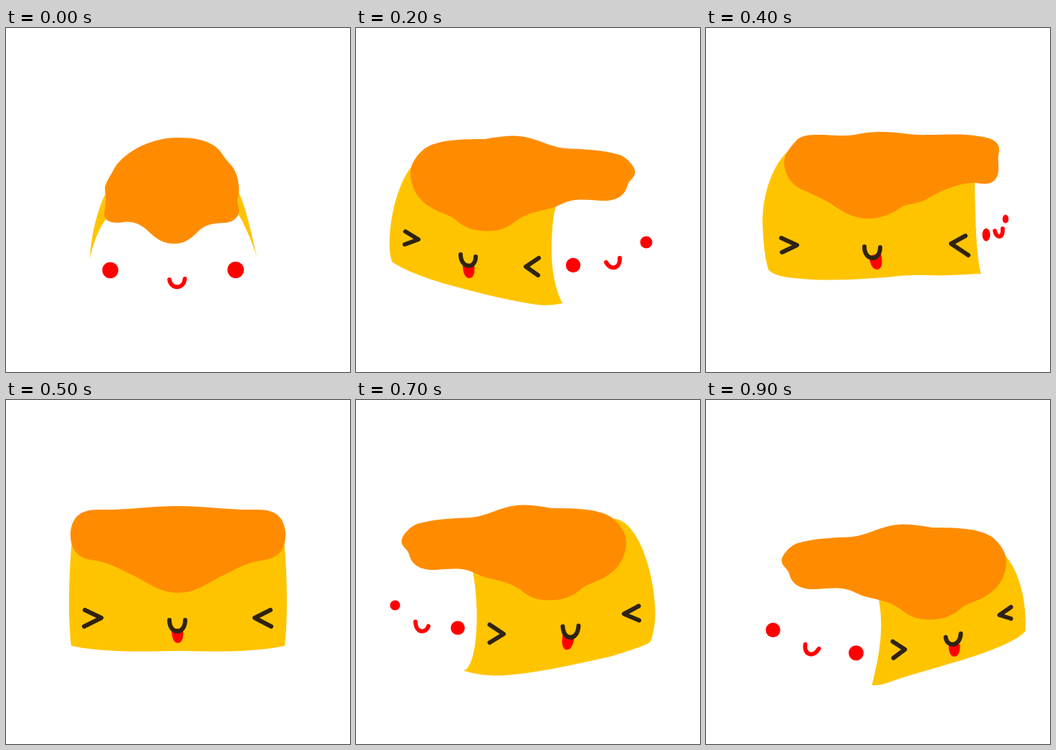
Write an HTML page that moves like this. It is 480 by 480 pixels and loops after 1000 ms.

```html
<!DOCTYPE html>
<html lang="en">
<head>
<meta charset="utf-8">
<title>Spinning pudding</title>
<style>
  html, body { margin: 0; width: 100%; height: 100%; overflow: hidden; background: #fff; }
  svg { display: block; width: 100%; height: 100%; }
  .pose {
    visibility: hidden;
    animation: show 1s step-end infinite;
    animation-delay: calc(var(--i) * 100ms - 1000ms);
  }
  @keyframes show {
    0% { visibility: visible; }
    10%, 100% { visibility: hidden; }
  }
  .cake { fill: #ffc400; }
  .sauce { fill: #ff8c00; }
  .red { fill: #f00; }
  .ink, .smile { fill: none; stroke-linecap: round; stroke-linejoin: round; }
  .ink { stroke: #2f2312; stroke-width: 6; }
  .smile { stroke: #f00; stroke-width: 5.8; }
</style>
</head>
<body>
<svg viewBox="0 0 480 480">
  <defs>
    <!-- sauce seen from two turned angles -->
    <path id="sauceWide" class="sauce" d="M96 190C96 178 104 166 116 156C134 144 165 143 200 143C215 140 228 138.500 240 138.500C270 139 285 153 312 156C335 157 365 158 388 165C400 170 410 183 409.500 190C408 198 402 199 399 207C396 220 386 230 362 229C346 228 330 226 316 230C304 234 300 238 288 240.500C270 245 258 247 245 256C230 268 220 271.500 202 271.500C180 271 168 264 157 254C146 247 134 245 124 238C108 229 96 212 96 190Z"/>
    <path id="sauceFlat" class="sauce" d="M109 188C109 176 118 166 126 157C134 148 150 149 165 149C180 150 192 151 208 149C222 145 240 145 248 145C268 145 285 150 310 149C335 149 360 147 380 151C400 153 411 160 409 173C406 182 409 190 408 200C406 214 398 219 382 217C368 214 352 219 338 224C326 228 316 234 304 241C290 246 284 245 274 249C260 259 245 266 226 266C202 265 190 255 178 248C168 240 152 234 140 228C122 222 110 208 109 188Z"/>

    <!-- cake with both faces, from steep to nearly frontal -->
    <g id="steep">
      <path class="cake" d="M68 207C46 222 30 270 33 318C38 328 75 345 125 360C165 372 195 380 218 388C230 393 238 394 247 394C236 350 229 310 239 267L200 200Z"/>
      <path class="red" d="M124 337Q124 354 132 354Q140 354 140 337Z"/>
      <path class="ink" d="M53 285L69 296L53 301M218 333L201 344L217 356M123 322C124 341 143 341 144 327"/>
      <circle class="red" cx="269" cy="349" r="10.5"/>
      <circle class="red" cx="385" cy="317" r="10.2"/>
      <path class="smile" d="M321 343C328 355 342 353 340 337"/>
    </g>
    <g id="turned">
      <path class="cake" d="M84 187C64 202 45 258 47 309C47 316 49 321 50 326C62 335 90 347 128 358C168 369 208 379 245 385C262 388 275 387 288 384C277 362 270 330 274 280C275 264 277 256 280 245L200 190Z"/>
      <path class="red" d="M149 331C149 343 153 349 158 349C165 349 166 340 165 330Z"/>
      <path class="ink" d="M69 284L87 295L68 302M255 321L237 333L254 345M146 316C146 336 167 337 167 319"/>
      <circle class="red" cx="303" cy="331" r="10.2"/>
      <circle class="red" cx="405" cy="299" r="8.5"/>
      <path class="smile" d="M349 327C354 338 369 337 368 321"/>
    </g>
    <g id="wide">
      <path class="cake" d="M118 161C112 162 104 165 98 172C76 195 61 250 61 293C61 310 64 321 66 329C68 335 74 337 85 341C102 346 115 352 135 356C180 366 230 377 275 380C297 380.500 313 378 329 373C318 373 309 340 310 290C311 262 313 245 317 230L200 180Z"/>
      <path class="red" d="M174 324C174 336 179 345 185 344C191 343 192 334 190 322Z"/>
      <path class="ink" d="M84 283L104.500 294L83.500 303M292 309L272.500 322L292 334M168 310.500C169 332 189 332 190 311.500"/>
      <circle class="red" cx="336.500" cy="313.500" r="9.800"/>
      <circle class="red" cx="424" cy="282" r="7"/>
      <path class="smile" d="M377.500 311C380 321 395 322 395.500 305"/>
    </g>
    <g id="flat">
      <path class="cake" d="M116 170C94 190 78 230 79 275C80 300 82 320 87 337C94 346 112 348 134 350C170 353 210 351 250 348C275 345 290 344 315 345C345 346 365 343 384 343C380 330 376 300 375 216L240 180Z"/>
      <path class="red" d="M228 318C228 330 233 337 239 337C246 336 247 327 244 314Z"/>
      <path class="ink" d="M105 293L127 303L106 313M362 290L342 301L366 317M221 305C221 326 243 326 243 306"/>
      <ellipse class="red" cx="391" cy="288.5" rx="5.5" ry="9"/>
      <ellipse class="red" cx="418" cy="266.5" rx="4.2" ry="6"/>
      <path class="smile" d="M403 283C405 294 415 294 414 280"/>
    </g>
  </defs>

  <!-- back: cut side with the small smile -->
  <g class="pose" style="--i:0">
    <path class="cake" d="M138 232C128 255 119 285 117 322C122 300 128 282 140 266ZM324 228C335 250 342 285 350 319C342 295 332 272 323 258Z"/>
    <path class="sauce" d="M138 222C142 210 146 206 150 198C160 178 196 153 240 153C262 153 278 156 290 164C300 170 303 180 312 189C320 197 324 208 325 222C326 232 321 240 325 252C327 262 318 272 303 272C292 273 282 272 270 282C258 294 250 301 234 301C220 301 209 294 199 284C188 273 176 269 163 271C150 273 137 271 137 259C139 247 139 235 138 222Z"/>
    <circle class="red" cx="145.5" cy="338" r="11.2"/>
    <circle class="red" cx="320.5" cy="337.5" r="11.5"/>
    <path class="smile" d="M228 351C230 365 248 365 249.500 350"/>
  </g>

  <g class="pose" style="--i:1">
    <use href="#steep"/>
    <path class="sauce" d="M66 212C68 197 88 174 122 167C150 162 172 161 190 161C212 161 230 170 254 174C275 178 296 175 320 183C338 189 354 200 351 213C348 228 338 228 331 240C324 252 322 262 309 262C296 262 286 252 268 254C256 256 246 265 238 269C222 273 208 274 194 284C182 292 168 297 154 297C138 296 132 283 118 276C106 270 92 275 76 260C64 248 70 228 66 212Z"/>
  </g>
  <g class="pose" style="--i:2">
    <use href="#turned"/>
    <use href="#sauceWide" x="-20" y="12"/>
  </g>
  <g class="pose" style="--i:3">
    <use href="#wide"/>
    <use href="#sauceWide"/>
  </g>
  <g class="pose" style="--i:4">
    <use href="#flat"/>
    <use href="#sauceFlat"/>
  </g>

  <!-- front -->
  <g class="pose" style="--i:5">
    <path class="cake" d="M92 195C88 240 86 300 91 343C140 353 195 351 240 350C285 351 340 353 389 343C394 300 392 240 388 195Z"/>
    <path class="sauce" d="M90 185C92 165 102 153 128 153C165 154 205 148 240 148C275 148 315 154 352 153C378 153 388 165 390 185C391 205 382 220 362 223C335 226 318 238 302 245C280 256 265 269 240 269C215 269 200 256 178 245C162 238 145 226 118 223C98 220 89 205 90 185Z"/>
    <path class="red" d="M231 319C231 332 234 339 239.500 339C246 339 248 332 247 319Z"/>
    <path class="ink" d="M110 293L133 304L109 316M369 293L347 304L370 316M228 307C228 328 250 328 250 307"/>
  </g>

  <!-- the way back, mirrored -->
  <g class="pose" style="--i:6">
    <use href="#flat" transform="translate(478.500 5) scale(-1 1)"/>
    <use href="#sauceFlat" transform="translate(480 6) scale(-1 1)"/>
  </g>
  <g class="pose" style="--i:7">
    <use href="#wide" transform="translate(478.500 4.500) scale(-1 1)"/>
    <use href="#sauceWide" transform="translate(473 8) scale(-1 1)"/>
  </g>
  <g class="pose" style="--i:8">
    <use href="#turned" transform="translate(478.500 4) scale(-1 1)"/>
    <use href="#sauceWide" transform="translate(494 21) scale(-1 1)"/>
  </g>
  <g class="pose" style="--i:9">
    <use href="#steep" transform="translate(478.500 4) scale(-1 1)"/>
    <use href="#sauceWide" transform="translate(515 35) scale(-1 1)"/>
  </g>
</svg>
</body>
</html>
```
